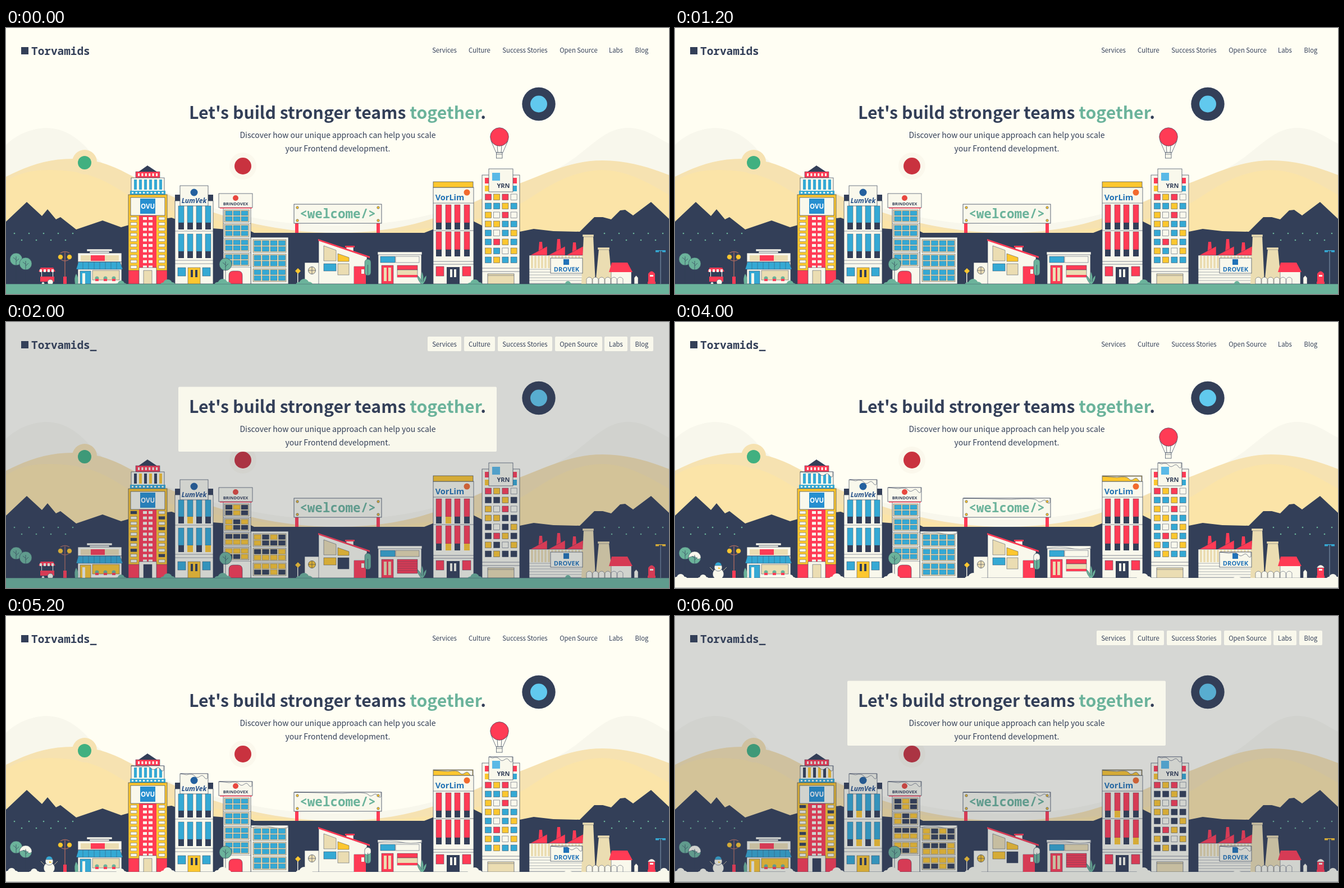
Write an HTML page that moves like this. It is 1181 px wide and 474 px high and loops after 8 s.

```html
<!DOCTYPE html>
<html lang="en">
<head>
<meta charset="utf-8">
<title>Stronger teams</title>
<style>
  html, body { margin: 0; width: 100%; height: 100%; overflow: hidden; background: #fffef3; }
  svg { display: block; width: 100%; height: 100%; }
  text { font-family: "Noto Sans CJK JP", "Noto Sans CJK SC", "Open Sans", sans-serif; font-weight: 500; text-anchor: middle; }
  .mono { font-family: "Noto Sans Mono", "DejaVu Sans Mono", monospace; font-weight: 700; }
  .bold { font-weight: 700; }
  .sign { font-family: "Open Sans", sans-serif; font-weight: 700; }
</style>
</head>
<body>
<svg id="stage" viewBox="0 0 1181 474"></svg>
<script>
const N = '#333f58', Y = '#fdc72f', R = '#ff3b55', B = '#35a9d4', C = '#f9f8ec', G = '#6bb39b', S = '#ebddb2';
const stage = document.getElementById('stage');
let out, night, winter;

const add = s => { out += s; };
const paint = (fill, line, ink = N) => `fill="${fill}"` + (line ? ` stroke="${ink}" stroke-width="${line}"` : '');
const rect = (x, y, w, h, fill, line, r = 0) =>
  add(`<rect x="${x}" y="${y}" width="${w}" height="${h}" rx="${r}" ${paint(fill, line)}/>`);
const circ = (x, y, r, fill, line) => add(`<circle cx="${x}" cy="${y}" r="${r}" ${paint(fill, line)}/>`);
const path = (d, fill, line, ink) => add(`<path d="${d}" ${paint(fill, line, ink)}/>`);
const text = (x, y, size, fill, str, cls = '', more = '') =>
  add(`<text x="${x}" y="${y}" font-size="${size}" fill="${fill}" class="${cls}" ${more}>${str}</text>`);
const lit = (c, r) => (c * 5 + r * 3 + c * r) % 4 == 1 ? Y : N;

function grid(x, y, cols, rows, dx, dy, w, h, pick, line) {
  for (let r = 0; r < rows; r++)
    for (let c = 0; c < cols; c++)
      rect(x + c * dx, y + r * dy, w, h, typeof pick == 'string' ? pick : pick(c, r), line);
}
function snow(x, y, w) {
  if (winter) path(`M${x} ${y}h${w}v8q-3 3 -6-2t-8-1t-9-1t-${w * .3}-2z`, C, .6);
}
function bush(x, r = 10) {
  const col = winter ? C : G;
  circ(x - r, 459, r * .7, col);
  circ(x, 456, r, col);
  circ(x + r, 459, r * .75, col);
}
function tree(x, y, r, snowy) {
  circ(x, y, r, G, .6);
  if (winter && snowy) path(`M${x - r} ${y}a${r} ${r} 0 0 1 ${2 * r} 0q-4 5 -8 0t-${2 * r - 8} 0z`, C, .5);
  path(`M${x} ${y - 5}V456M${x} ${y + 4}l5-5M${x} ${y + 1}l-5-4`, 'none', .7);
}

function hills() {
  rect(0, 0, 1181, 474, '#fffef3');
  path('M0 208C30 180 70 172 100 183C145 200 150 235 200 258C300 300 420 352 590 352C760 352 850 300 960 260C1030 235 1055 178 1108 178C1140 178 1160 196 1181 206V474H0z', '#f8f7ec');
  path('M0 265C40 245 75 233 118 233C185 233 220 264 270 288C370 337 480 365 590 365C740 365 810 318 890 286C960 262 1000 236 1063 236C1110 236 1150 250 1181 262V474H0z', '#f6e2b1');
  path('M0 273C25 258 45 253 75 253C140 253 170 268 205 290C270 330 460 366 590 366C740 366 870 345 935 302C980 272 1015 255 1060 253C1110 253 1150 280 1181 297V474H0z', '#fbe4a8');
  path('M0 345L37 310L64 335L74 323L89 341L97 337L125 359L172 343L205 355L240 345L295 338L340 355L436 362L442 365H745L765 357L832 344L848 352L915 363L940 358L975 362L1022 363L1048 337L1063 337L1078 341L1094 325L1103 324L1117 334L1149 310L1181 340V474H0z', N);
  for (const x0 of [15, 1066]) for (let i = 0; i < 9; i++) circ(x0 + i * 13, i % 2 ? 378 : 366, 1.3, G);
}

function street() {
  tree(18, 412, 11);
  tree(35, 420, 11, true);
  if (winter) {
    circ(77, 449, 10, C, .6);
    circ(77, 437, 7, C, .6);
    path('M71 434a6 6 0 0 1 12 0z', B, .5);
    path('M77 437l5 2l-5 1z', Y);
    path('M68 443l-6-6M86 443l6-6', 'none', .8, S);
  } else {
    path('M62 427h22l4 7h-30z', R);
    for (let x = 60; x < 88; x += 7) rect(x, 430, 4, 5, C);
    path('M63.5 435v9M83.5 435v9', 'none', 1, C);
    rect(61, 443, 25, 9, R);
    circ(79, 453, 5, C, .6); circ(66, 455, 2.5, C, .6);
  }
  // double street lamp
  path('M105 400V456M97 412q8 6 16 0M97 401q8-5 16 0', 'none', 1.4, '#a8695f');
  rect(102, 443, 6, 13, R);
  circ(97, 408, 4.5, Y, .7); circ(113, 408, 4.5, Y, .7);
  // corner shop
  rect(144, 394, 45, 4, C, .6); rect(149, 398, 35, 5, C, .6);
  rect(128, 401, 78, 16, C, .7); rect(133, 405, 68, 10, S); rect(151, 405, 25, 10, R);
  rect(128, 417, 78, 39, C, .7);
  rect(132, 433, 19, 23, night ? Y : B, .5); rect(136, 437, 5, 19, C);
  rect(154, 432, 48, 17, night ? Y : S, .5);
  for (let x = 162; x < 200; x += 15) { circ(x, 446, 3.5, G); rect(x - 3, 447, 6, 4, R); }
  path('M129 417h74l5 13h-83z', B, .5);
  for (let x = 137; x < 206; x += 10) path(`M${x} 417v13`, 'none', .4);
  path('M123 456q-2-12 2-18q5 7 3 18z', G);
}

function tower() {
  path('M235 257L252 245L270 257z', N);
  rect(231, 256, 43, 11, R, .5);
  grid(235, 259, 6, 1, 6.4, 0, 3, 5, C);
  rect(223, 267, 59, 24, C, .7);
  grid(228, 270, 6, 1, 9, 0, 5, 18, night ? (c => lit(c, 1)) : B);
  rect(221, 290, 63, 7, B);
  grid(224, 292, 9, 1, 6.7, 0, 3, 3, C);
  rect(218, 297, 69, 159, Y, .7);
  rect(237, 334, 31, 98, R);
  grid(244, 337, 2, 10, 10, 9.6, 7, 5, C);
  const side = (c, r) => night && (r * 3 + c * 5) % 7 < 2 ? N : C;
  grid(222, 337, 2, 10, 50, 9.6, 11, 5, side, .4);
  rect(222, 302, 61, 32, C, .7);
  rect(239, 304, 27, 27, '#268fd0');
  text(252.5, 322, 11.5, '#fff', 'OVU', 'sign');
  snow(223, 267, 58);
  rect(218, 432, 69, 24, R, .5);
  rect(237, 427, 31, 29, C, .6); rect(245, 432, 15, 24, night ? N : S, .5);
}

function barWindows(xs, rows, top) {
  rows.forEach(([y, h], r) => xs.forEach((x, c) => {
    rect(x, y, 10, h, top, .4);
    rect(x, y + h, 10, 12, night ? lit(c, r) : N);
  }));
}

function offices() {
  rect(301, 297, 68, 12, N);
  rect(301, 308, 68, 148, C, .7);
  rect(310, 281, 50, 36, C, .7);
  circ(335, 293, 6.5, '#24619f');
  text(335, 312, 12, '#24508a', 'LumVek', 'sign', 'font-style="italic"');
  snow(311, 281, 48);
  barWindows([307, 323, 339, 355], [[317, 30], [367, 31]], B);
  path('M301 362h68M301 414h68M301 420h68', 'none', .5);
  rect(306, 427, 14, 15, B, .5); rect(350, 427, 14, 15, B, .5);
  rect(324, 427, 22, 29, Y, .5); rect(329, 431, 4, 13, N); rect(337, 431, 4, 13, N);

  rect(436, 373, 67, 83, C, .7);
  rect(387, 320, 49, 136, C, .7);
  const glass = shift => night ? (c, r) => lit(c + shift, r + shift) : B;
  for (let i = 0; i < 4; i++) {
    rect(389, 324 + i * 26, 44, 22, S, .5);
    grid(391, 326 + i * 26, 3, 2, 14, 10, 12, 8, glass(i), .3);
    path(`M387 ${348.5 + i * 26}h49`, 'none', .4);
  }
  for (let i = 0; i < 3; i++) {
    rect(440, 377 + i * 26, 59, 23, S, .5);
    grid(442, 379 + i * 26, 4, 2, 14.5, 10.5, 12, 8.5, glass(i + 1), .3);
  }
  rect(379, 295, 60, 25, C, .7); rect(381, 320, 57, 1.5, R);
  circ(409, 303, 5, '#e8483f');
  text(409, 316, 7.6, N, 'BRINDOVEX', 'sign');
  snow(380, 295, 58);
  if (winter) path('M437 373h65v4q-15 3-30-1t-35 1z', C, .5);
  path('M397 456V441q0-8 8-8h8q8 0 8 8v15z', R, .6);
  tree(391, 421, 11);
}

function middle() {
  rect(515, 347, 6, 18, R); rect(660, 347, 6, 18, R);
  rect(513, 314, 156, 34, C, .8);
  snow(514, 314, 154);
  for (const x of [519, 663]) for (const y of [320, 343]) circ(x, y, 2.2, Y, .6);
  text(591, 338.5, 22.6, G, '&lt;welcome/&gt;', 'mono');

  // house
  rect(519, 433, 1.4, 23, C); path('M520 428l5 5l-5 5l-5-5z', Y);
  rect(532, 418, 26, 38, C, .6);
  circ(545, 432, 6.5, night ? Y : S, .7); path('M538.5 432h13M545 425.5v13', 'none', .6);
  rect(606, 390, 13, 18, C, .6); rect(604, 388, 17, 3, R);
  path('M557 378L643 408V425H620V456H557z', C, .6);
  path('M556 376L648 407V410L556 379z', R);
  path('M566 388L588 396V415H566z', S, .5);
  path('M591 402L611 409V416H591z', Y, .5);
  rect(566, 420, 22, 13, night ? Y : B, .5); rect(591, 420, 20, 20, night ? N : S, .5);
  rect(620, 425, 21, 31, R); rect(633, 430, 5, 8, C);

  // kiosk
  rect(663, 403, 77, 53, C, .7); rect(662, 399, 79, 5, C, .6);
  if (winter) path('M662 399h78v4q-20 4-36 0t-42 0z', C, .5);
  rect(667, 407, 26, 11, B, .5); rect(694, 407, 42, 11, night ? S : C, .5);
  rect(669, 423, 21, 33, R, .5); rect(673, 427, 5, 24, S); rect(681, 427, 5, 24, S);
  rect(697, 423, 36, night ? 25 : 8, R, .5);
  if (night) for (let y = 427; y < 447; y += 4) path(`M697 ${y}h36`, 'none', .4);
  else { rect(697, 431, 36, 13, S, .5); rect(697, 440, 36, 4, R); }
  rect(639, 412, 11, 29, G, .5, 5.5);
  if (winter) path('M639 424v-6a5.5 5.5 0 0 1 11 0v4q-5 5-11 2z', C, .4);
  path('M644.5 422v34', 'none', .7);
  path('M741 458q-9-10-8-17q6 5 7 11q-2-10 1-18q4 8 2 18q1-8 6-11q0 10-8 17z', G, .4);
}

function highrises() {
  rect(761, 284, 72, 172, C, .7);
  rect(761, 274, 71, 10, Y, .7);
  path('M761 312h72M761 361h72M761 416h72M761 421h72', 'none', .6);
  snow(762, 275, 69);
  circ(821, 293, 5.5, '#f26a2e');
  text(790.5, 307, 14.5, '#2272b4', 'VorLim', 'sign');
  barWindows([766, 783, 799, 816], [[315, 32], [363, 32]], R);
  rect(766, 425, 14, 17, R, .5); rect(813, 425, 15, 17, R, .5);
  rect(785, 426, 23, 30, N); rect(791, 430, 4, 14, C); rect(798, 430, 4, 14, C);

  rect(848, 262, 67, 194, C, .7);
  rect(853, 267, 8, 10, R); rect(903, 267, 7, 10, R);
  rect(853, 281, 8, 10, Y); rect(903, 281, 7, 10, B);
  rect(860, 251, 43, 41, C, .7);
  rect(866, 258, 14, 14, '#5ab9e6');
  text(886, 285, 11, N, 'YRN', 'sign');
  snow(861, 251, 41);
  const tint = { R, Y, B: night ? N : B, C };
  const rows = ['RYRC', 'BBYB', 'YCRC', 'YYBB', 'BCBY', 'BRYB', 'YBCY', 'BYBB'];
  grid(853.5, 296, 4, 8, 15.2, 16, 11, 10.5, (c, r) => tint[rows[r][c]], .5);
  path('M848 428h67M848 434h67', 'none', .6);
  rect(858, 438, 47, 18, S, .6); path('M858 441h47', 'none', .5);
}

function factory() {
  for (const [x, y] of [[949, 381], [981, 376], [1009, 382]]) path(`M${x + 1} ${y}h5l2 25h-9z`, R);
  for (let x = 932; x < 1020; x += 32) path(`M${x} 406L${x + 32} 389V406z`, R, .5);
  rect(932, 405, 96, 51, C, .6);
  for (let x = 935; x < 1026; x += 6) rect(x, 406, 4, 22, S);
  for (let y = 430; y < 456; y += 5) path(`M932 ${y}h96`, 'none', .4);
  path('M1029 370h17l4 86h-25z', S); rect(1027, 368, 20, 4, S, .4);
  path('M1056 394h18l6 62h-30z', S); rect(1054, 391, 21, 4, S, .4);
  rect(970, 410, 57, 27, C, .7);
  rect(993, 412, 10, 10, '#2173b8');
  text(998.5, 433.5, 11.2, '#2173b8', 'DROVEK', 'sign');
  snow(971, 410, 55);
  rect(1078, 434, 36, 22, C, .5);
  path('M1074 435l5-17h28l9 17z', R);
  for (let x = 1034; x < 1100; x += 11) path(`M${x} 456v-9q5-6 10 0v9z`, C, .5);
  path('M1119 456v-11l3.5-4l3.5 4v11z', C, .5);
  path('M1144 456v-18q6-9 12 0v18z', R); rect(1147, 440, 6, 3, C); rect(1143, 452, 14, 4, R);
  if (winter) path('M1143 438q7-10 14 0z', C, .4);
  rect(1165.3, 397, 1.4, 59, '#6d8299');
  const lamp = night ? Y : B;
  rect(1157, 396, 18, 1.5, lamp); rect(1157, 397, 6, 2.5, lamp); rect(1169, 397, 6, 2.5, lamp);
}

function ground() {
  for (const [x, r] of [[288, 8], [386, 9], [531, 9], [835, 8], [205, 6], [1001, 5]]) bush(x, r);
  if (winter) { bush(10, 7); bush(50, 6); bush(1172, 7); }
  rect(0, 456, 1181, 18, winter ? C : G);
  if (winter) rect(0, 473, 1181, 1, '#b9bcbc');
  else path('M0 456.3H1181', 'none', .4);
}

function badges() {
  circ(140, 239, 22, '#f6e2b1'); circ(140, 240, 12, '#41b080');
  circ(422, 246, 24, '#fbf8ec'); circ(422, 246, 15, '#c9323f');
  circ(949, 135.5, 29.7, N); circ(949, 135.5, 15, '#61c9ee');
  if (night) return;
  const y = winter ? 205 : 194;
  path(`M864 ${y + 7}L873 ${y + 28}H885L894 ${y + 7}M875 ${y + 14}l1 14M883 ${y + 14}l-1 14`, 'none', .7);
  rect(873.5, y + 28, 10.5, 10, C, .7); path(`M873 ${y + 31}h11`, 'none', .6);
  circ(879, y, 16.3, R, .7);
}

function page(cursor) {
  rect(27, 34, 13, 13, N);
  text(45, 47.5, 19.4, N, 'Torvamids' + (cursor ? '_' : ''), 'mono', 'style="text-anchor:start"');
  const links = [['Services', 751, 60], ['Culture', 816, 55], ['Success Stories', 876, 97],
    ['Open Source', 978, 84], ['Labs', 1066, 41], ['Blog', 1112, 41]];
  for (const [label, x, w] of links) {
    if (night) rect(x, 26, w, 26, C, 0, 2);
    text(x + w / 2, 44, 11.3, N, label);
  }
  if (night) rect(307, 115.5, 567, 115.5, C, 0, 2);
  text(590.5, 162, 30.25, N, `Let's build stronger teams <tspan fill="${G}">together</tspan>.`, 'bold');
  text(591, 196, 14, N, 'Discover how our unique approach can help you scale');
  text(591, 220, 14, N, 'your Frontend development.');
}

function draw(step) {
  out = '';
  night = step % 2 == 1;
  winter = step > 1;
  [hills, street, tower, offices, middle, highrises, factory, ground, badges].forEach(part => part());
  if (night) add(`<rect width="1181" height="474" fill="${N}" opacity=".2"/>`);
  page(step > 0);
  stage.innerHTML = out;
}

let shown = -1;
const start = performance.now();
function tick() {
  const step = Math.floor((performance.now() - start) / 2000) % 4;
  if (step != shown) draw(shown = step);
  requestAnimationFrame(tick);
}
tick();
</script>
</body>
</html>
```
